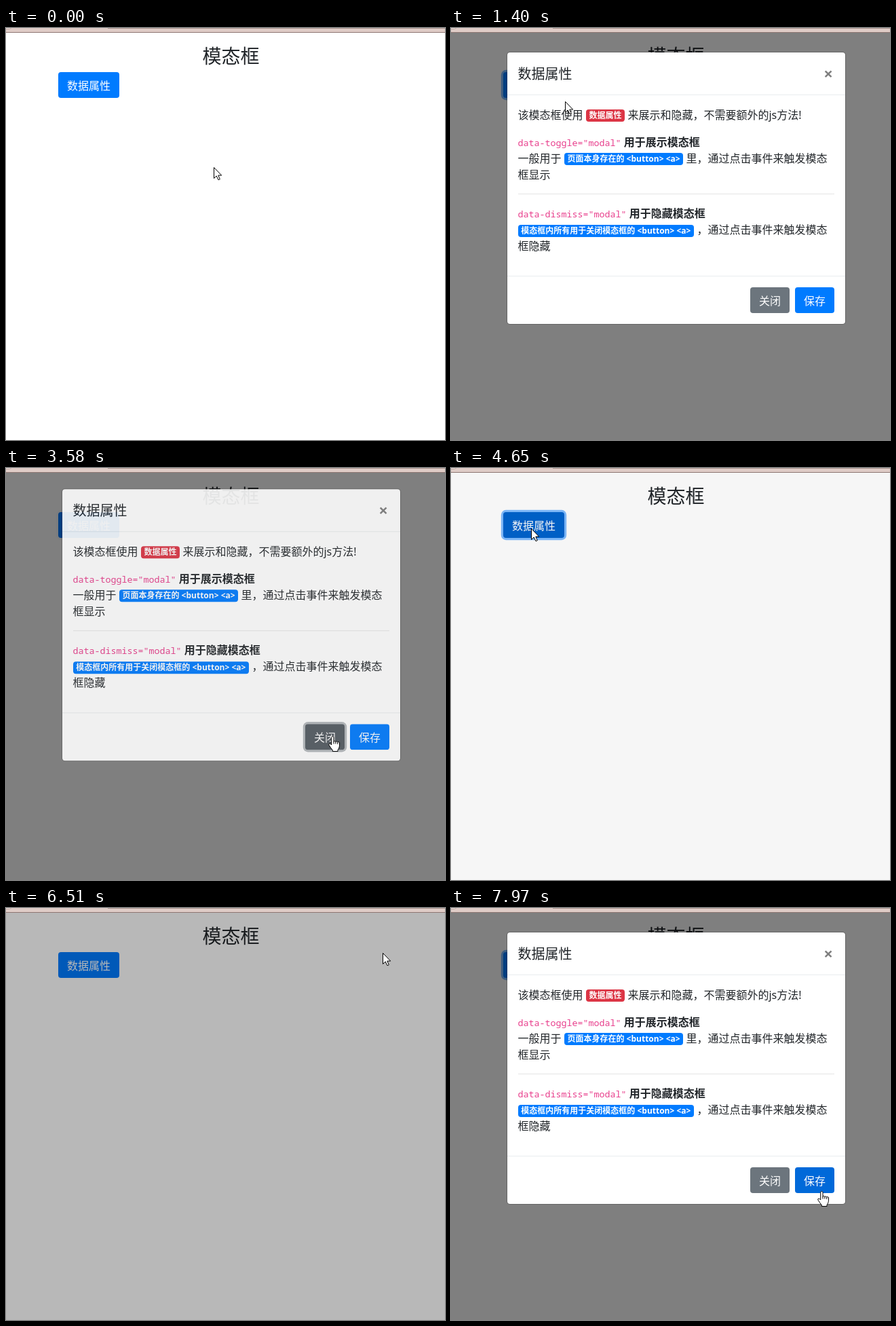
Animation of 647 by 607 pixels, one loop 8000 ms. Source, as an HTML page:

```html
<!DOCTYPE html>
<html lang="zh-CN">
<head>
<meta charset="utf-8">
<title>模态框</title>
<style>
* { box-sizing: border-box; }
html, body { margin: 0; width: 100%; height: 100%; overflow: hidden; background: #fff; }
body { position: relative; color: #212529; font: 16px/1.5 "Noto Sans", "Noto Sans CJK SC", "Noto Sans CJK", sans-serif; }
#bar { position: absolute; inset: 0 0 auto; height: 7px; background: #dfccc7; border-bottom: 1px solid #8d7672; }
#bar i { position: absolute; left: 150px; right: 0; top: 0; height: 1px; background: #a8948f; }
#bar b { position: absolute; left: -6px; top: -3px; width: 15px; height: 5px; border: 1px solid #b9a5a0; border-radius: 0 0 5px 0; background: #efe3e0; }
#view { position: absolute; inset: 7px 0 0; overflow: hidden; }
h3 { position: absolute; left: 231.5px; top: 18px; width: 200px; margin: 0; text-align: center; font-size: 28px; line-height: 33.6px; font-weight: 400; }
.btn { height: 38px; padding: 7px 12px 5px; border: 1px solid transparent; border-radius: 4px; color: #fff; line-height: 24px; white-space: nowrap; }
#open { position: absolute; left: 77px; top: 58px; width: 90px; }
#shade { position: absolute; inset: 0; background: #000; }
#modal { position: absolute; left: 81.5px; top: 28.4px; width: 500px; height: 401.6px; border: 1px solid rgba(0,0,0,.2); border-radius: 5px; background: #fff; background-clip: padding-box; white-space: nowrap; }
header { height: 63px; padding: 17px 16px 15px; border-bottom: 1px solid #e9ecef; font-size: 20px; line-height: 30px; }
#x { position: absolute; left: 461.5px; top: 12.5px; width: 24px; text-align: center; font-size: 24px; line-height: 36px; font-weight: 700; color: #000; }
main { height: 265.6px; padding: 16px; }
p { position: relative; top: .8px; margin: 0 0 16px; }
p + p, hr + p { margin-bottom: 16.3px; }
hr { margin: 16px 0; border: 0; border-top: 1px solid rgba(0,0,0,.1); }
code { font: 500 13.35px/1.5 "Noto Sans Mono", "DejaVu Sans Mono", monospace; color: #e83e8c; }
.tag { position: relative; top: -.8px; display: inline-block; padding: 3px 4.8px; border-radius: 4px; background: #007bff; color: #fff; font-size: 12px; line-height: 1; font-weight: 700; }
.red { background: #dc3545; }
footer { display: flex; justify-content: flex-end; gap: 8px; height: 71px; padding: 16px 15.5px; border-top: 1px solid #e9ecef; }
#cursor { position: absolute; left: 0; top: 0; width: 24px; height: 28px; overflow: visible; fill: #fff; stroke: #000; stroke-linejoin: round; }
</style>
</head>
<body>
<div id="view">
  <h3>模态框</h3>
  <div id="open" class="btn">数据属性</div>
  <div id="shade"></div>
  <div id="modal">
    <header>数据属性<span id="x">×</span></header>
    <main>
      <p>该模态框使用 <span class="tag red">数据属性</span> 来展示和隐藏，不需要额外的js方法!</p>
      <p><code>data-toggle="modal"</code> <strong>用于展示模态框</strong><br>
      一般用于 <span class="tag">页面本身存在的 &lt;button&gt; &lt;a&gt;</span> 里，通过点击事件来触发模态<br>框显示</p>
      <hr>
      <p><code>data-dismiss="modal"</code> <strong>用于隐藏模态框</strong><br>
      <span class="tag">模态框内所有用于关闭模态框的 &lt;button&gt; &lt;a&gt;</span> ，通过点击事件来触发模态<br>框隐藏</p>
    </main>
    <footer><div id="close" class="btn">关闭</div><div id="save" class="btn">保存</div></footer>
  </div>
</div>
<div id="bar"><i></i><b></b></div>
<svg id="cursor">
  <path id="arrow" d="M.5.5V16.5L4.2 13L7 18.8L9.3 17.8L6.8 12.1H11.7Z"/>
  <g id="hand" transform="translate(-5 0)">
    <path d="M6.4.6C5.3.6 4.7 1.3 4.7 2.3V13L3.2 11.5C1.9 10.3.2 11.5.9 13.1L4 17.8L6.3 20.5V22.5H14V20.4C15.6 18.4 16.5 16 16.5 13.2V10C16.5 8.3 14.2 8 13.8 9.4C13.6 7.6 11.3 7.2 10.9 8.8C10.6 7 8.4 6.8 8 8.2V2.3C8 1.3 7.4.6 6.4.6Z"/>
    <path fill="none" d="M8 8V11.5M10.9 8.8V11.5M13.8 9.4V12"/>
  </g>
</svg>
<script>
const LOOP = 8000, FADE = 150;
const $ = id => document.getElementById(id);
const clamp = v => Math.max(0, Math.min(1, v));
const ramp = (t, from, len = FADE) => clamp((t - from) / len);
const easeOut = v => 1 - (1 - v) ** 1.7;

// Pointer stops: time, x, y
const path = [
  [0, 306, 205], [150, 306, 205], [800, 122, 90], [1020, 122, 90], [1400, 168, 108],
  [2280, 376, 298], [2430, 376, 298], [2800, 520, 420], [3200, 480, 395], [3650, 480, 395],
  [4400, 118, 89], [4700, 118, 89], [5050, 125, 95], [5620, 440, 120], [5740, 440, 120],
  [6100, 555, 66], [6790, 555, 66], [7300, 119, 88], [7500, 122, 90], [7820, 540, 405],
  [7970, 545, 417], [8000, 545, 417]
];
// Dialog: click that opens it, click that closes it
const dialogs = [[960, 3564], [4641, 6280], [7456, 9999]];
const presses = [[860, 960], [4550, 4660], [7350, 7456]];
const focus = [[860, 3440], [3880, 6200], [6600, 9999]];
const closePress = [[3440, 3600]], closeFocus = [[3400, 3800]];
const areas = {
  open: [77, 65, 90, 38], close: [441, 382, 58, 38],
  save: [507, 382, 58, 38], x: [540, 50, 32, 36]
};

const within = (spans, t) => spans.some(([a, b]) => t >= a && t < b);
const fadeSpans = (spans, t) => Math.max(...spans.map(([a, b]) => ramp(t, a) - ramp(t, b)));

function pointer(t) {
  const i = path.findIndex(p => p[0] > t);
  const [a, b] = [path[i - 1], path[i]];
  const k = (t - a[0]) / (b[0] - a[0]), e = k * k * (3 - 2 * k);
  return [a[1] + (b[1] - a[1]) * e, a[2] + (b[2] - a[2]) * e];
}

function over(name, t) {
  const shown = within(dialogs, t);
  if (name === "open" ? shown || shadeAt(t) > 0 : !shown || modalAt(t).alpha <= 0) return false;
  const [x, y] = pointer(t), [l, top, w, h] = areas[name];
  return x >= l && x < l + w && y >= top && y < top + h;
}

// Share of the last fade time spent hovering
function hover(name, t) {
  let sum = 0;
  for (let k = 0; k < 6; k++) sum += over(name, Math.max(0, t - k * FADE / 6));
  return sum / 6;
}

const shadeAt = t => Math.max(...dialogs.map(([a, b]) => ramp(t, a) - ramp(t, b + 165)));

function modalAt(t) {
  const [a, b] = dialogs.findLast(d => t >= d[0]) || dialogs[0];
  const start = a + 142;
  return {
    alpha: ramp(t, start) - ramp(t, b),
    lift: 50 * (1 - easeOut(ramp(t, start, 300)) + easeOut(ramp(t, b, 300)))
  };
}

function mix(from, to, k) {
  return `rgb(${from.map((v, i) => v + (to[i] - v) * k)})`;
}

function paint(name, [base, dark, active], ring, down, t) {
  const style = $(name).style;
  style.background = down ? `rgb(${active})` : mix(base, dark, hover(name, t));
  style.boxShadow = ring > 0 ? `0 0 0 3.2px rgba(${base},${ring / 2})` : "none";
}

const blue = [[0, 123, 255], [0, 105, 217], [0, 98, 204]];
const grey = [[108, 117, 125], [90, 98, 104], [84, 91, 98]];

function draw(t) {
  const modal = modalAt(t), [x, y] = pointer(t);
  $("shade").style.opacity = shadeAt(t) / 2;
  $("modal").style.opacity = modal.alpha;
  $("modal").style.transform = modal.lift > .05 ? `translateY(${-modal.lift}px)` : "none";
  paint("open", blue, fadeSpans(focus, t), within(presses, t), t);
  paint("close", grey, fadeSpans(closeFocus, t), within(closePress, t), t);
  paint("save", blue, 0, false, t);
  $("x").style.opacity = .5 + .25 * hover("x", t);
  const hand = Object.keys(areas).some(name => over(name, t)) || within(closePress, t);
  $("hand").style.display = hand ? "" : "none";
  $("arrow").style.display = hand ? "none" : "";
  $("cursor").style.transform = `translate(${Math.round(x)}px,${Math.round(y)}px)`;
}

const begin = performance.now();
function tick() {
  draw((performance.now() - begin) % LOOP);
  requestAnimationFrame(tick);
}
tick();
</script>
</body>
</html>
```
